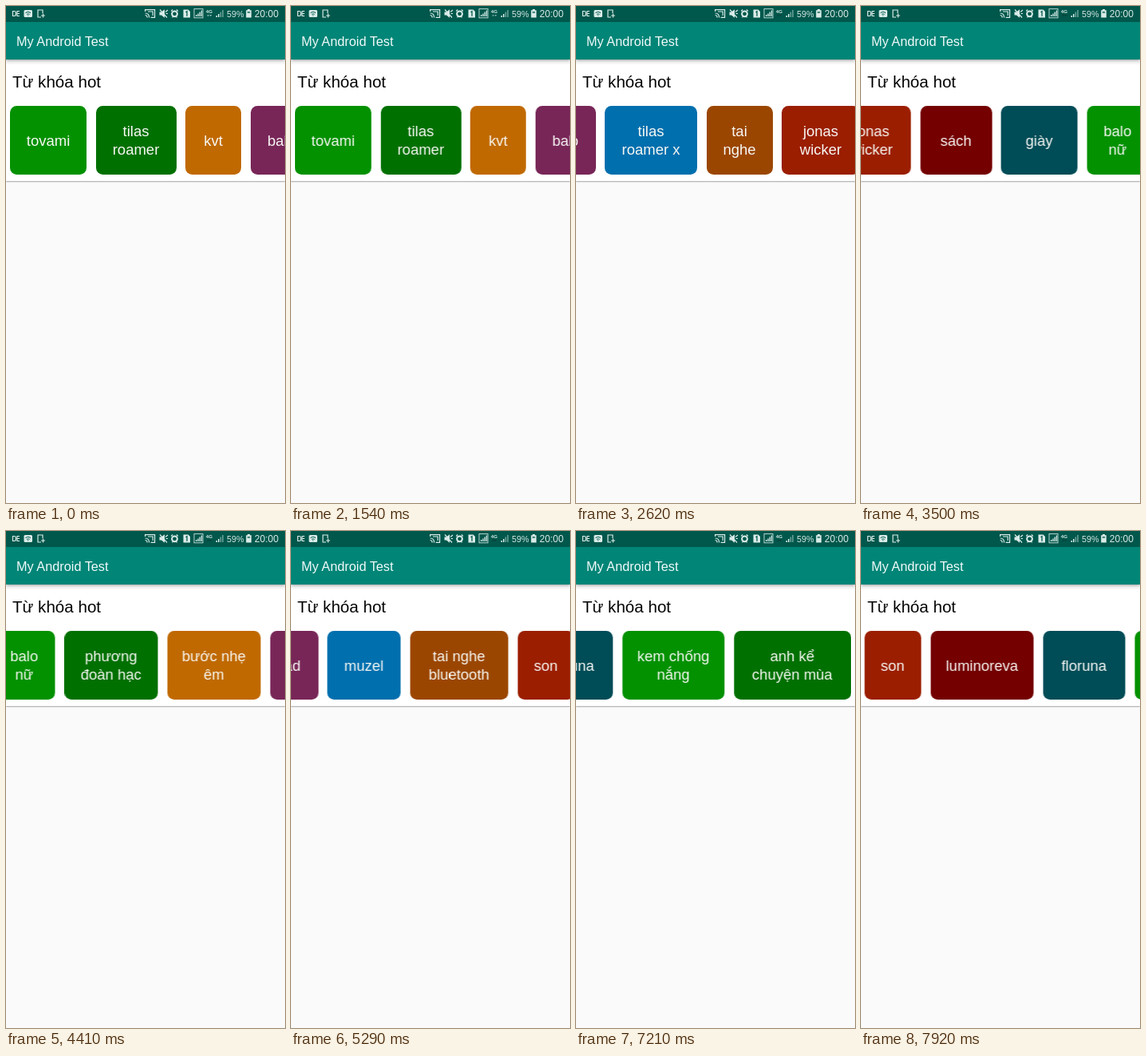
Animation of 350 by 622 pixels, one loop 8000 ms. Source, as an HTML page:

```html
<!DOCTYPE html>
<html lang="vi">
<head>
<meta charset="utf-8">
<title>My Android Test</title>
<style>
  html, body { margin: 0; width: 100%; height: 100%; overflow: hidden; }
  body { background: #fafafa; font-family: "Liberation Sans", Arial, sans-serif; }
  #stage { position: relative; width: 350px; height: 622px; overflow: hidden; background: #fafafa; }
  #stage > * { position: absolute; }

  .status { left: 0; top: 0; }
  .bar {
    left: 0; top: 20px; width: 350px; height: 47px; background: #008577;
    box-shadow: 0 1px 4px rgba(0, 0, 0, .4);
  }
  .panel {
    left: 0; top: 73px; width: 350px; height: 146px; background: #fff;
    box-shadow: 0 1px 1.5px rgba(0, 0, 0, .35);
  }
  .title { left: 13px; top: 34px; font-size: 16.3px; line-height: 20px; color: #f2faf9; white-space: nowrap; }
  .heading { left: 8px; top: 82px; font-size: 20.6px; line-height: 26px; color: #050505; white-space: nowrap; }

  .strip {
    left: 5px; top: 125px; display: flex; gap: 11.5px;
    animation: scroll 8s infinite;
  }
  .card {
    flex: none; box-sizing: border-box; height: 85.5px; padding-top: 2px; border-radius: 8.5px;
    display: flex; align-items: center; justify-content: center;
    font-size: 18.5px; line-height: 22.5px; color: #f8f8f4;
    text-align: center; white-space: pre;
  }
  .glow {
    right: 0; top: 125px; width: 29px; height: 91px; opacity: 0;
    background: #008577; border-radius: 100% 0 0 100% / 50% 0 0 50%;
    transform-origin: 100% 50%; animation: glow 8s infinite linear;
  }
  .data { animation: data 8s infinite step-end; }

  @keyframes scroll {
    0%, 19.25% { transform: translateX(0); animation-timing-function: cubic-bezier(.3, .2, .2, 1); }
    29.125% { transform: translateX(-358px); animation-timing-function: ease-out; }
    30.875%, 32.75% { transform: translateX(-360px); animation-timing-function: ease-in-out; }
    34.875%, 36.875% { transform: translateX(-385px); animation-timing-function: cubic-bezier(.3, .2, .2, 1); }
    44.625%, 46.5% { transform: translateX(-655px); animation-timing-function: cubic-bezier(.3, .2, .2, 1); }
    55.125% { transform: translateX(-952.5px); animation-timing-function: ease-out; }
    59.25%, 61.5% { transform: translateX(-960px); animation-timing-function: cubic-bezier(.35, .3, .55, .9); }
    66.125% { transform: translateX(-1337px); animation-timing-function: cubic-bezier(.2, .6, .4, 1); }
    70.875%, 72.25% { transform: translateX(-1408px); animation-timing-function: cubic-bezier(.35, .3, .55, .9); }
    77% { transform: translateX(-1837px); animation-timing-function: cubic-bezier(.2, .6, .4, 1); }
    82%, 90.125% { transform: translateX(-1903px); animation-timing-function: cubic-bezier(.3, .2, .2, 1); }
    99%, 100% { transform: translateX(-1617.5px); }
  }
  @keyframes glow {
    0%, 82% { opacity: 0; transform: scaleX(.2); }
    83.2% { opacity: .3; transform: scaleX(1); }
    87.75%, 100% { opacity: 0; transform: scaleX(.4); }
  }
  @keyframes data {
    0% { fill: #9cc4bf; }
    5.875% { fill: #83b0aa; }
    32.75% { fill: #12423f; }
    36.875%, 100% { fill: #0a3d36; }
  }
</style>
</head>
<body>
<div id="stage">
  <div class="panel"></div>
  <div class="bar"></div>
  <svg class="status" width="350" height="20" fill="#d9ebe8" stroke="none">
    <rect width="350" height="20" fill="#00574b"/>
    <!-- notifications -->
    <g fill="none" stroke="#d9ebe8" stroke-width="1.2">
      <path d="M8.5 6.5h2q2 0 2 3t-2 3h-2zM17 6.5h-3v6h3M14 9.5h3"/>
      <path d="M44 14h-4V5h6v4M44 12h5M46.500 9.500v5"/>
    </g>
    <rect x="22.500" y="5" width="10.500" height="9" rx="1.5"/>
    <path d="M24.500 8.500q3.200-2.500 6.500 0M26 10.500q1.800-1.500 3.500 0M27.200 12h1" fill="none" stroke="#00574b"/>
    <!-- cast, mute, alarm -->
    <g fill="none" stroke="#d9ebe8" stroke-width="1.200">
      <path d="M174.600 7V4.600h12v9.800h-5M174.600 9q5 0 5 5.400M174.600 11.500q2.600 0 2.600 2.900M178 7h6.200v5"/>
      <path d="M193 4.500l9 10M200 7.500l3-2.500M200.500 9.500h2.500"/>
      <circle cx="211.500" cy="9.800" r="3.400" stroke-width="2"/>
      <path d="M207.200 6.500l2-2M215.800 6.500l-2-2M208.500 14.500l1-1.500M214.500 14.500l-1-1.500"/>
    </g>
    <path d="M192.500 7.500h2.500l4-3.200v10.400l-4-3.200h-2.500z"/>
    <!-- sim and signal -->
    <path d="M222.500 4.500h6l2.500 2.500v7.500h-8.500z"/>
    <path d="M225.500 7.800l1.500-1v6" fill="none" stroke="#00574b" stroke-width="1.300"/>
    <rect x="236" y="3.600" width="11" height="11.200" fill="none" stroke="#b9d6d2"/>
    <path d="M238 13v-2h1.400v2zM240.300 13V9.500h1.400V13zM242.600 13V7.500h1.400V13zM244.800 13V5.500h1.200V13z"/>
    <text x="250.800" y="8.800" font-size="6.200" font-weight="bold">4G</text>
    <path class="data" d="M252 12.500l1.500-2 1.500 2zM255.200 11l1.500 2 1.500-2z"/>
    <path d="M263.500 14v-2h1.500v2zM266 14v-4h1.500v4z"/>
    <path d="M268.600 14V7.500h1.500V14zM271.200 14V5h1.500v9z" fill="#6fa39c"/>
    <text x="277" y="14" font-size="10.700">59%</text>
    <path d="M303 4h3v1.200h1.800v9.300h-6.600V5.200h1.800z"/>
    <path d="M302.800 6.800h3.400v2.200h-3.400z" fill="#4d8981"/>
    <text x="311.800" y="13.800" font-size="12">20:00</text>
  </svg>
  <div class="title">My Android Test</div>
  <div class="heading">Từ khóa hot</div>
  <div class="strip"></div>
  <div class="glow"></div>
</div>
<script>
  const colors = ["#039100", "#007000", "#c06900", "#782658", "#006fae",
                  "#9b4600", "#9b1e00", "#740000", "#004c57"];
  const cards = [
    ["tovami", 96], ["tilas\nroamer", 101], ["kvt", 70], ["balo", 78],
    ["tilas\nroamer x", 116], ["tai\nnghe", 83], ["jonas\nwicker", 98],
    ["sách", 90], ["giày", 96], ["balo\nnữ", 77.5], ["phương\nđoàn hạc", 117.5],
    ["bước nhẹ\nêm", 117.5], ["salad", 88], ["muzel", 92],
    ["tai nghe\nbluetooth", 123.5], ["son", 71.5], ["luminoreva", 129.5],
    ["floruna", 103.5], ["kem chống\nnắng", 128.5], ["anh kể\nchuyện mùa", 147]
  ];
  const strip = document.querySelector(".strip");
  cards.forEach(([label, width], i) => {
    const card = document.createElement("div");
    card.className = "card";
    card.textContent = label;
    card.style.width = width + "px";
    card.style.background = colors[i % colors.length];
    strip.append(card);
  });
</script>
</body>
</html>
```
